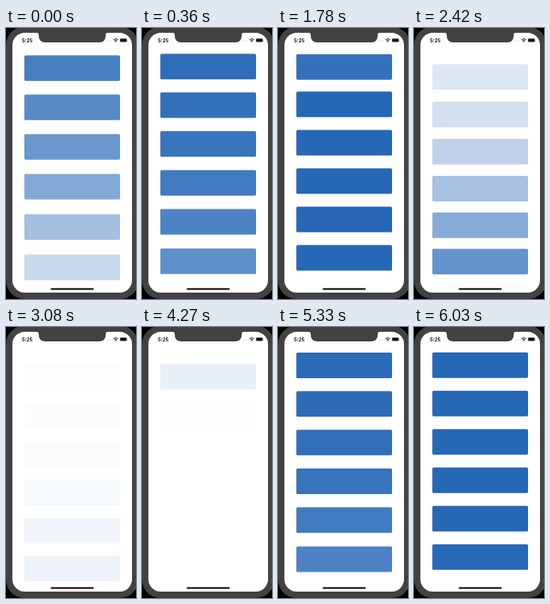
Animation of 163x339 px, one loop 6.19 s. Source, as an HTML page:

```html
<!DOCTYPE html>
<html lang="en">
<head>
<meta charset="utf-8">
<title>Staggered rows</title>
<style>
  html, body { margin: 0; width: 100%; height: 100%; overflow: hidden; background: #000; }
  svg { display: block; width: 100vw; height: 100vh; }
  text { font: 700 6px Inter, "Liberation Sans", sans-serif; }
</style>
</head>
<body>
<svg viewBox="0 0 163 339" preserveAspectRatio="none">
  <rect x="0" y="-1.5" width="166" height="340.5" rx="23" fill="#424242"/>
  <rect x="8" y="6" width="150" height="325" rx="15.5" fill="#fff"/>
  <path d="M39 5.5V6Q41 6 41 8.5V9.5Q41 18 49.5 18H116.5Q125 18 125 9.5V8.5Q125 6 127 6V5.5Z" fill="#424242"/>

  <text x="20" y="17.6" textLength="auto" fill="#111">5:25</text>
  <g fill="#bbb">
    <circle cx="126.8" cy="16" r=".5"/>
    <circle cx="128.5" cy="16" r=".5"/>
    <circle cx="130.2" cy="16" r=".5"/>
    <circle cx="131.9" cy="16" r=".5"/>
  </g>
  <g fill="none" stroke="#111" stroke-width="1">
    <path d="M134.8 14.6Q137.6 12.2 140.4 14.6M136 16Q137.6 14.7 139.2 16"/>
  </g>
  <circle cx="137.6" cy="17" r=".7" fill="#111"/>
  <rect x="143" y="13.2" width="8.4" height="4.2" rx="1.2" fill="#111" stroke="#999" stroke-width=".4"/>
  <rect x="151.8" y="14.6" width=".6" height="1.5" fill="#888"/>

  <g id="rows" fill="#2667b6"></g>
  <rect x="56" y="325.4" width="54" height="2" rx="1" fill="#000"/>
</svg>
<script>
  const LOOP = 6190, STAGGER = 100, DROP = 16, OMEGA = 4.62;
  const SHOW = -707, HIDE = 1690, SHOW_AGAIN = 4153;
  const group = document.getElementById('rows');

  const rows = Array.from({ length: 6 }, (_, i) => {
    const row = document.createElementNS('http://www.w3.org/2000/svg', 'rect');
    const attrs = { x: 23, y: 31.6 + 48 * i, width: 120, height: 32, rx: 1.6 };
    for (const key in attrs) row.setAttribute(key, attrs[key]);
    return group.appendChild(row);
  });

  // Critically damped spring from 0 to 1
  function spring(ms) {
    const p = OMEGA * Math.max(0, ms) / 1000;
    return 1 - (1 + p) * Math.exp(-p);
  }

  function draw(now) {
    const time = now % LOOP;
    rows.forEach((row, i) => {
      const t = time - i * STAGGER;
      const sum = spring(t - SHOW) - spring(t - HIDE) + spring(t - SHOW_AGAIN);
      const shown = Math.min(1, Math.max(0, sum));
      row.setAttribute('opacity', shown.toFixed(4));
      row.setAttribute('transform', `translate(0 ${((1 - shown) * DROP).toFixed(3)})`);
    });
  }

  const start = performance.now();
  function tick() {
    draw(performance.now() - start);
    requestAnimationFrame(tick);
  }
  tick();
</script>
</body>
</html>
```
